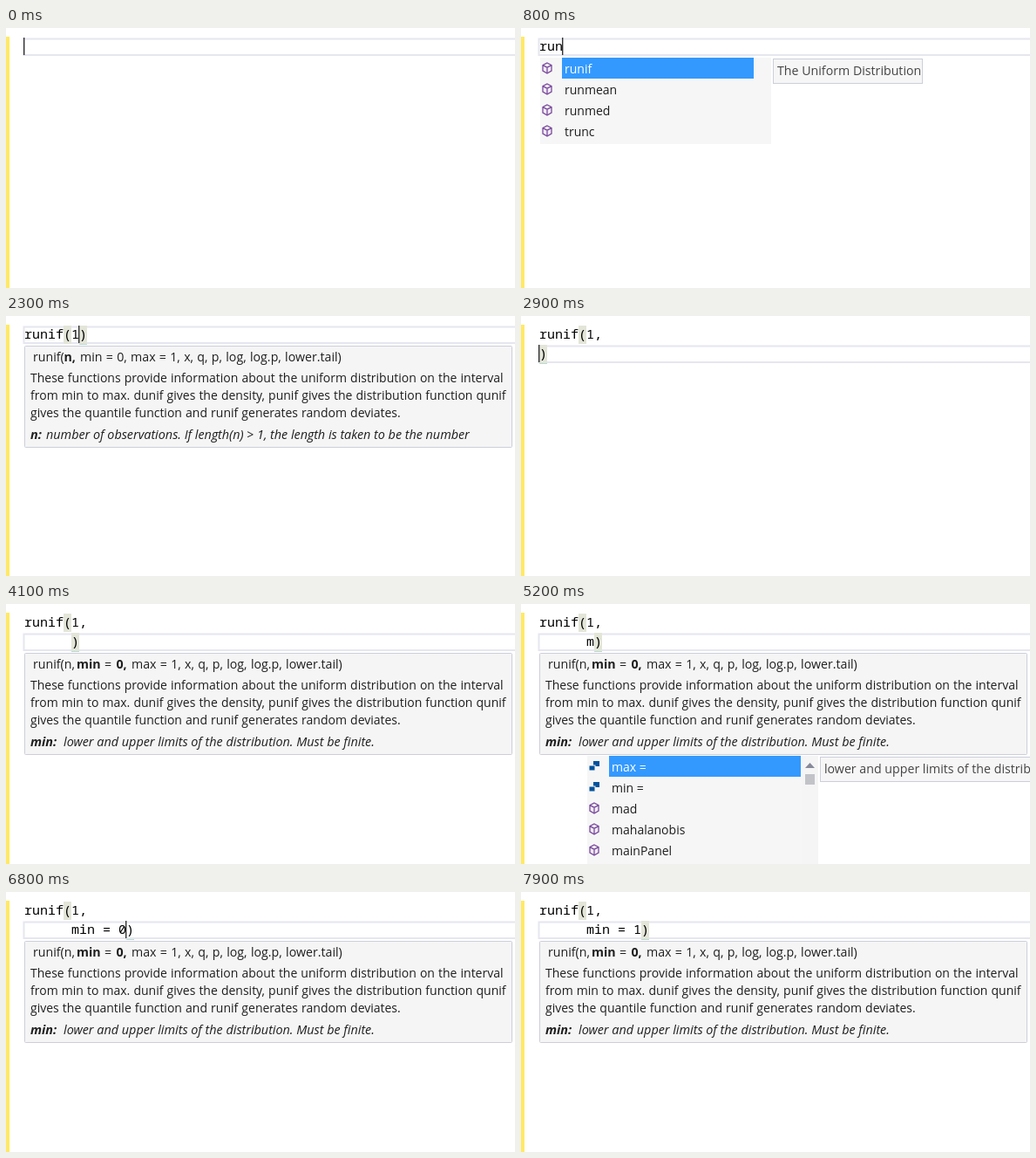
Animation of 584x298 px, one loop 8 s. Source, as an HTML page:

```html
<!DOCTYPE html>
<html lang="en">
<head>
<meta charset="utf-8">
<title>Typing runif with parameter hints</title>
<style>
html, body { margin: 0; width: 100%; height: 100%; overflow: hidden; background: #fff; }
svg { display: block; width: 584px; height: 298px; }
text { white-space: pre; font: 14px "Open Sans", "Noto Sans", sans-serif; fill: #1e1e1e; }
.code { font: 15px "Noto Sans Mono", "DejaVu Sans Mono", monospace; fill: #000; }
.sig { font-size: 14.2px; word-spacing: .6px; }
.body { word-spacing: .45px; }
.bold { font-weight: 700; }
.note { font-size: 14.4px; font-style: italic; }
.doc { font-size: 14.2px; fill: #444; }
.sel { fill: #fff; }
</style>
</head>
<body>
<svg id="stage" viewBox="0 0 584 298"></svg>
<script>
const LOOP = 8000, CHAR = 9, LEFT = 21, ROW = 24, LIST_W = 265, BLINK = 530;
const stage = document.getElementById('stage');

const TIPS = [
  { sig: [[31, 'runif('], [66.5, 'n,', 'bold'], [85, 'min = 0, max = 1, x, q, p, log, log.p, lower.tail)']],
    name: 'n:', nameEnd: 46,
    note: 'number of observations. If length(n) > 1, the length is taken to be the number' },
  { sig: [[31, 'runif(n,'], [81, 'min', 'bold'], [113, '='], [126.5, '0,', 'bold'],
      [144, 'max = 1, x, q, p, log, log.p, lower.tail)']],
    name: 'min:', nameEnd: 66,
    note: 'lower and upper limits of the distribution. Must be finite.' }
];
const ABOUT = [
  'These functions provide information about the uniform distribution on the interval',
  'from min to max. dunif gives the density, punif gives the distribution function qunif',
  'gives the quantile function and runif generates random deviates.'
];
const LISTS = {
  r: { items: ['rainbow', 'rank', 'rapply', 'raw', 'rbeta', 'rbind', 'rbinom'], pick: 0 },
  ru: { items: ['rug', 'runif', 'runmean', 'runmed', 'isTRUE', 'structure', 'trunc'], pick: 1 },
  run: { items: ['runif', 'runmean', 'runmed', 'trunc'], pick: 0 },
  m: { items: ['max =', 'min =', 'mad', 'mahalanobis', 'mainPanel', 'make.names', 'mantelhaen.test'], pick: 0 },
  mi: { items: ['min =', 'min'], pick: 0 }
};
const UNIFORM = { text: 'The Uniform Distribution', w: 172 };
const LIMITS = { text: TIPS[1].note, w: 390 };

// Each step changes only the listed fields; "edit" restarts the caret blink.
// match: 0 none, 1 opening brace, 2 both braces
const STEPS = [
  [0, { a: '', b: null, col: 0, match: 0, tip: null, list: null, doc: null, edit: -450 }],
  [400, { a: 'r', col: 1, list: 'r', edit: 400 }],
  [600, { a: 'ru', col: 2, list: 'ru', edit: 600 }],
  [700, { doc: UNIFORM }],
  [800, { a: 'run', col: 3, list: 'run', edit: 800 }],
  [1000, { a: 'runi', col: 4, edit: 1000 }],
  [1200, { a: 'runif', col: 5, list: null, doc: null, edit: 1200 }],
  [1500, { a: 'runif()', col: 6, edit: 1500 }],
  [1700, { tip: 0, match: 2 }],
  [2200, { a: 'runif(1)', col: 7, edit: 2200 }],
  [2500, { a: 'runif(1,)', col: 8, tip: 1, edit: 2500 }],
  [2900, { a: 'runif(1,', b: ')', col: 0, tip: null, edit: 2900 }],
  [3000, { tip: 1 }],
  [3100, { b: '      )', col: 6, match: 0, edit: 3100 }],
  [3300, { match: 2 }],
  [4600, { b: '      m)', col: 7, match: 1, edit: 4600 }],
  [4800, { match: 2, list: 'm' }],
  [4900, { doc: LIMITS }],
  [5400, { b: '      mi)', col: 8, list: 'mi', edit: 5400 }],
  [5600, { b: '      min)', col: 9, doc: null, edit: 5600 }],
  [5900, { b: '      min )', col: 10, list: null, edit: 5900 }],
  [6100, { b: '      min =)', col: 11, edit: 6100 }],
  [6300, { b: '      min = )', col: 12, edit: 6300 }],
  [6700, { b: '      min = 0)', col: 13, match: 1, edit: 6700 }],
  [6900, { match: 2 }],
  [7100, { b: '      min = )', col: 12, edit: 7100 }],
  [7300, { b: '      min = 1)', col: 13, match: 1, edit: 7300 }],
  [7500, { match: 2 }]
];

const rect = (x, y, w, h, fill, stroke, extra = '') =>
  `<rect x="${x}" y="${y}" width="${w}" height="${h}" fill="${fill}"` +
  (stroke ? ` stroke="${stroke}"` : '') + ` ${extra}/>`;
const text = (x, y, str, cls = '') =>
  `<text x="${x}" y="${y}" class="${cls}">${str.replace(/>/g, '&gt;')}</text>`;
const path = (d, fill, stroke = 'none') =>
  `<path d="${d}" fill="${fill}" stroke="${stroke}" stroke-width="1.3"/>`;
const colX = c => LEFT + c * CHAR;

function drawTip(tip, y) {
  return rect(21.5, y + .5, 559, 116, '#f5f5f5', '#cccedb', 'rx="1"') +
    tip.sig.map(([x, str, cls = '']) => text(x, y + 18, str, 'sig ' + cls)).join('') +
    ABOUT.map((str, i) => text(28, y + 42 + i * 20, str, 'body')).join('') +
    text(28, y + 107, tip.name, 'note bold') +
    text(tip.nameEnd, y + 107, tip.note, 'note');
}

function icon(x, y, isParam) {
  if (isParam) return rect(x + 6, y - 6, 7, 6, '#00539c') +
    rect(x + 1, y - 1, 7, 6, '#00539c', '#f6f6f6');
  return path(`M${x + 7} ${y - 6}l5 2.6v6.5l-5 2.9l-5 -2.9v-6.5z` +
    `m-5 2.6l5 2.6l5 -2.6m-5 2.6v6.5`, '#f0eaf5', '#7a4a9c');
}

function drawList({ items, pick }, x, y) {
  const h = items.length * ROW + 3;
  let out = rect(x, y, LIST_W, h, '#f6f6f6');
  items.forEach((item, i) => {
    const top = y + i * ROW;
    if (i === pick) out += rect(x + 25, top, 220, ROW, '#3399ff');
    out += icon(x + 1, top + 12, item.includes('=')) +
      text(x + 28, top + 18, item, i === pick ? 'sel' : '');
  });
  if (items.length > 4) out += rect(x + 246, y, 19, h, '#f5f5f5') +
    path(`M${x + 250} ${y + 14}h11l-5.5 -6z`, '#868999') +
    rect(x + 250, y + 21, 11, 12, '#c2c3c9');
  return out;
}

function draw(s, caretOn) {
  const second = s.b !== null, top = second ? 33 : 11;
  const line = second ? s.b : s.a;
  const close = line.indexOf(')');
  let out = rect(0, 0, 584, 298, '#fff') + rect(0, 10, 4, 288, '#ffe964') +
    rect(20.5, top + 1.5, 570, 18.5, '#fff', '#e6e6f0', 'stroke-width="2"');
  if (s.match) out += rect(66, 11, 9, 21, '#e3e5d8');
  if (close >= 0) {
    if (s.match === 2) out += rect(colX(close), top, 9, 21, '#e3e5d8');
    out += rect(colX(close), top + 21, 9, 1, '#b5dcd2');
  }
  out += text(LEFT, 26, s.a, 'code');
  if (second) out += text(colX(s.b.search(/\S/)), 48, s.b.trim(), 'code');
  if (caretOn) out += rect(colX(s.col) - 1, top, 1.4, 20, '#333');

  const tipY = second ? 56 : 34;
  if (s.tip !== null) out += drawTip(TIPS[s.tip], tipY);
  if (s.list) {
    const x = second ? 76 : 22, y = s.tip !== null ? tipY + 118 : tipY;
    out += drawList(LISTS[s.list], x, y);
    if (s.doc) out += rect(x + LIST_W + 2.5, y + 1.5, s.doc.w - 1, 28, '#f6f6f6', '#cccedb') +
      text(x + LIST_W + 7, y + 20, s.doc.text, 'doc');
  }
  stage.innerHTML = out;
}

let shown = '';
function tick() {
  const t = performance.now() % LOOP;
  const past = STEPS.filter(([at]) => at <= t);
  const state = Object.assign({}, ...past.map(step => step[1]));
  const caretOn = (t - state.edit) % (2 * BLINK) < BLINK;
  const key = past.length + ':' + caretOn;
  if (key !== shown) {
    draw(state, caretOn);
    shown = key;
  }
  requestAnimationFrame(tick);
}
tick();
</script>
</body>
</html>
```
